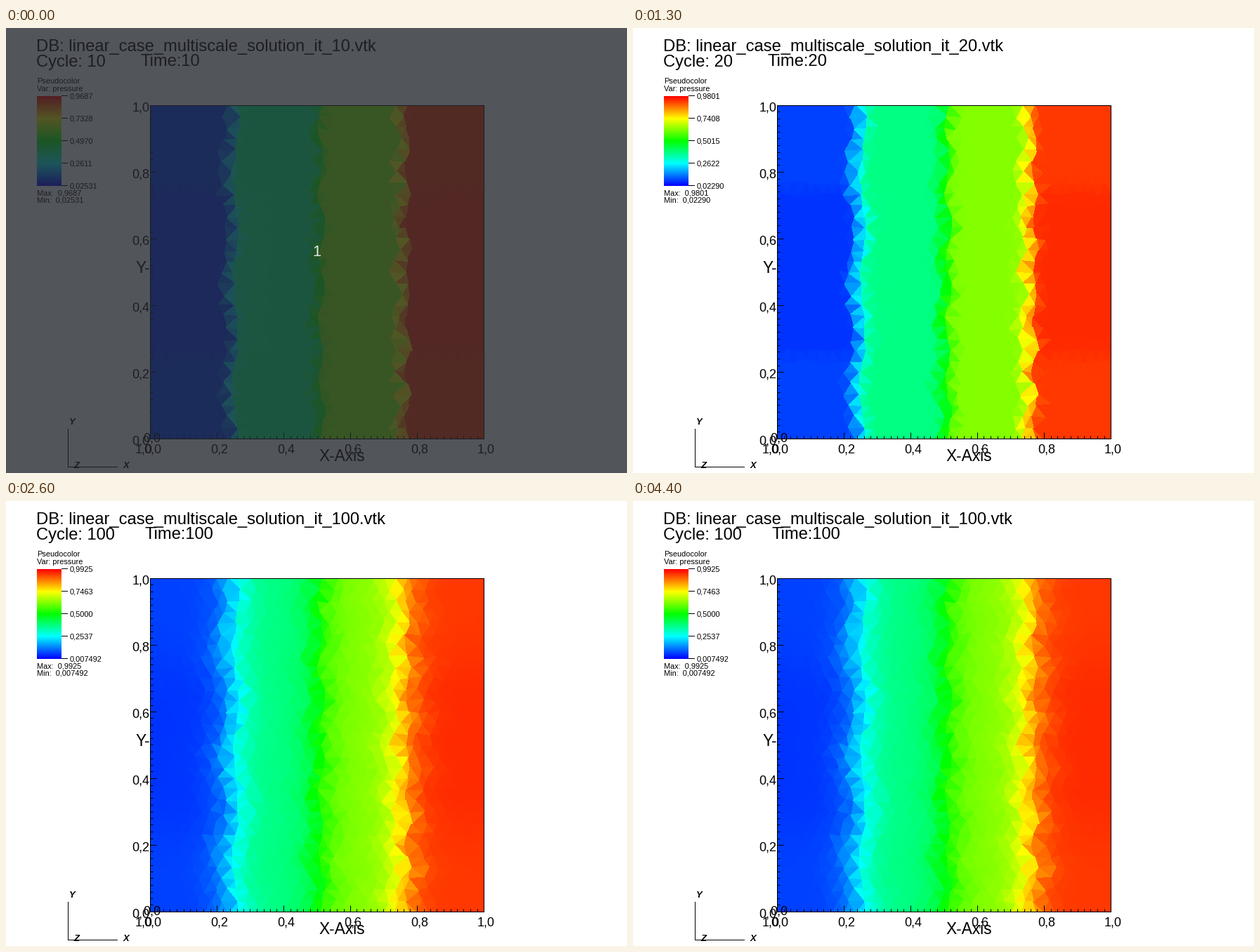
Write a matplotlib script that moves like this. It is 884 px wide and 634 px high and loops after 5.4 s.

```python
import numpy as np
import matplotlib.pyplot as plt
from matplotlib.animation import FuncAnimation
from matplotlib.collections import LineCollection, PolyCollection
from matplotlib.colors import LinearSegmentedColormap
from matplotlib.patches import Rectangle
from matplotlib.tri import Triangulation

W, H, DPI = 884, 634, 100
STEP, LOOP = 100, 5400
X0, Y0, SIDE = 205.5, 110.5, 475
X1, Y1 = X0 + SIDE, Y0 + SIDE
N = 30
CELL = SIDE / N

RAINBOW = LinearSegmentedColormap.from_list(
    "rainbow", ["#0000ff", "#00ffff", "#00ff00", "#ffff00", "#ff0000"], N=1024)

# Pressure fronts: mean x, sway, y of a crest, period, centre shift, jump
FRONTS = [
    (327, 4.5, 290, 150, -5, 0.310),
    (449, 4.0, 190, 90, -4, 0.255),
    (572, 5.0, 165, 72, -9, 0.318),
]

# start ms, iteration, lowest and highest pressure
STAGES = [
    (0, 10, 0.02531, 0.96866),
    (1300, 20, 0.0229, 0.9801),
    (2000, 50, 0.01455, 0.9973),
    (2600, 100, 0.007492, 0.992508),
]


def front_x(y, mean, sway, crest, period):
    return mean + sway * np.cos(2 * np.pi * (y - crest) / period)


def build_mesh(rng):
    """Triangles of a jittered grid whose edges follow the fronts."""
    rows = Y0 + CELL * np.arange(N + 1)
    points = [(front_x(y, *f[:4]) + rng.uniform(-2, 2), y)
              for f in FRONTS for y in rows]
    seam = np.array(points)
    for k, y in enumerate(rows):
        edge_row = k in (0, N)
        shift = 0 if edge_row else (k % 2) * CELL / 2
        for j in range(N + 1):
            x, dy = X0 + j * CELL, 0
            if not edge_row and 0 < j < N:
                x += shift + rng.uniform(-3, 3)
                dy = rng.uniform(-3, 3)
            p = (min(x, X1), y + dy)
            if np.hypot(*(seam - p).T).min() > 0.6 * CELL:
                points.append(p)
    pts = np.array(points)
    return pts[Triangulation(pts[:, 0], pts[:, 1]).triangles]


rng = np.random.default_rng(7)
cells = build_mesh(rng)
cx, cy = cells.mean(axis=1).T
wobble = rng.normal(0, 0.1, len(cells))


def pressure(it):
    """Scaled pressure of every cell; fronts soften as iterations grow."""
    spread = np.log10(it) - 1
    width, steep, blur = 12 + 15 * spread, 1 - spread, 0.4 * it
    p = np.full(len(cells), 0.063)
    for *curve, shift, jump in FRONTS:
        u = (cx - front_x(cy, *curve) - shift) / width + wobble
        p += jump / 2 * (1 + np.tanh(u + steep * u**3))
    band = 0.5 * (1 - np.tanh((abs(cy - 348) - 118) / blur))
    side = np.clip((cx - 443) / 120, -1, 1) ** 5
    return p + 0.013 * band * side


fig = plt.figure(figsize=(W / DPI, H / DPI), dpi=DPI, facecolor="white")
ax = fig.add_axes([0, 0, 1, 1])
ax.set_xlim(0, W)
ax.set_ylim(H, 0)
ax.axis("off")


def label(x, y, s="", px=18, **kw):
    kw = {"family": "Liberation Sans", "color": "black", "zorder": 5,
          "va": "baseline", **kw}
    return ax.text(x, y, s, fontsize=px * 72 / DPI, **kw)


def lines(segments):
    ax.add_collection(LineCollection(
        segments, colors="black", linewidths=72 / DPI, zorder=4, snap=False))


def comma(s):
    return s.replace(".", ",")


# Mesh and frame
label(185, 349, "Y-", 22.8, zorder=1)
mesh = PolyCollection(cells, cmap=RAINBOW, edgecolors="face", linewidths=0.4,
                      antialiased=False, zorder=2)
mesh.set_clim(0, 1)
ax.add_collection(mesh)
ax.add_patch(Rectangle((X0, Y0), SIDE, SIDE, fill=False, lw=72 / DPI,
                       ec="black", zorder=4, snap=False))

# Ticks and axis labels
ticks = []
for i in range(51):
    size = 9 if i % 10 == 0 else 4
    x, y = X0 + round(i * SIDE / 50), Y1 - round(i * SIDE / 50)
    ticks += [[(x, Y1), (x, Y1 - size)], [(X0, y), (X0 + size, y)]]
lines(ticks)
for i in range(6):
    pos = i * SIDE / 5
    num = comma(f"{i / 5:.1f}")
    label(X0 + pos + 3, 606, num, ha="center")
    label(204.5, Y1 - pos + 8, num, ha="right")
label(184, 606, "1,0")
label(195, 589, "0,0")
label(445, 617, "X-Axis", 22.8)

# Orientation triad
lines([[(88.5, 571), (88.5, 626)], [(88, 625.5), (159, 625.5)]])
for x, y, s in [(90, 565, "Y"), (167, 627, "X"), (96, 627, "Z")]:
    label(x, y, s, 13, weight="bold", style="italic")

# Legend
ax.imshow(np.linspace(1, 0, 256)[:, None], cmap=RAINBOW, aspect="auto",
          extent=(44, 79, 225, 97), zorder=2)
lines([[(79, 96.5 + 32 * i), (88, 96.5 + 32 * i)] for i in range(5)])
label(44, 79, "Pseudocolor", 11)
label(44, 90, "Var: pressure", 11)
values = [label(90.5, 100 + 32 * i, px=11) for i in range(5)]
top = label(44, 238, px=11)
low = label(44, 249, px=11)

# Header
title = label(43, 32.5, px=23.8)
cycle = label(43, 54.5, px=23.8)
clock = label(192, 54.5, px=23.8)

# Dimmed opening
cover = [
    ax.add_patch(Rectangle((0, 0), W, H, fc="#24272e", alpha=0.79, lw=0, zorder=8)),
    label(442, 325, "1", 22, ha="center", color="#dde3e1", zorder=9),
]


def update(i):
    now = i * STEP
    _, it, lo, hi = [s for s in STAGES if s[0] <= now][-1]
    mesh.set_array(pressure(it))
    numbers = [comma(f"{v:#.4g}") for v in np.linspace(hi, lo, 5)]
    for text, s in zip(values, numbers):
        text.set_text(s)
    top.set_text(f"Max:  {numbers[0]}")
    low.set_text(f"Min:  {numbers[-1]}")
    title.set_text(f"DB: linear_case_multiscale_solution_it_{it}.vtk")
    cycle.set_text(f"Cycle: {it}")
    clock.set_text(f"Time:{it}")
    clock.set_x(198 if it >= 100 else 192)
    for part in cover:
        part.set_visible(now < 100)
    return []


anim = FuncAnimation(fig, update, frames=LOOP // STEP, interval=STEP,
                     init_func=lambda: [], repeat=True, repeat_delay=0)
plt.show()
```
